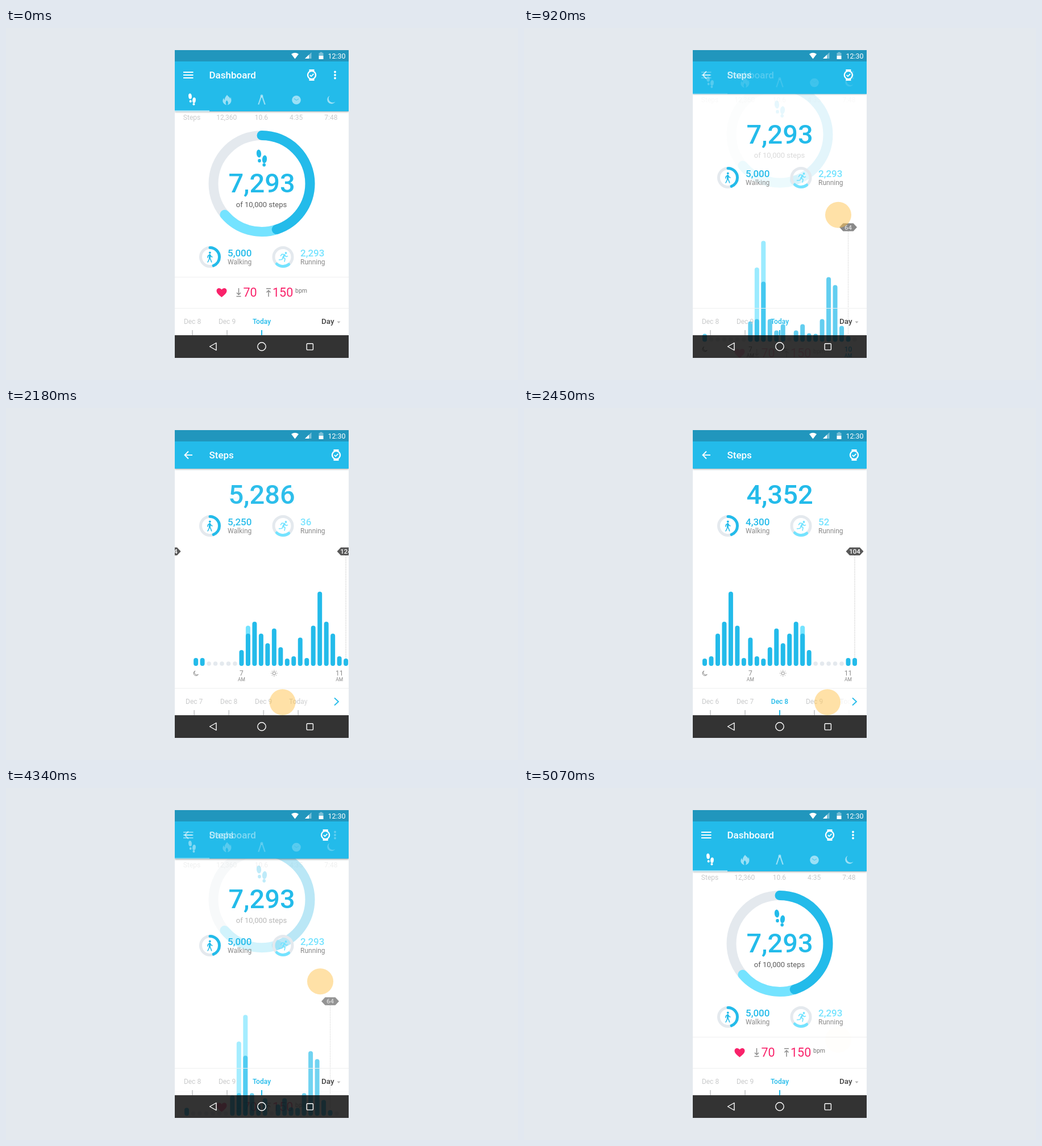
Recreate the animation shown at these times as an HTML page with a canvas. Size 901 by 621 pixels, loop 5.6 s.

```html
<!DOCTYPE html>
<html lang="en">
<head>
<meta charset="utf-8">
<title>Step tracker</title>
<style>
html, body { margin: 0; width: 100%; height: 100%; overflow: hidden; background: #e4e9ee; }
canvas { display: block; }
</style>
</head>
<body>
<canvas id="stage" width="901" height="621"></canvas>
<script>
const ctx = document.getElementById('stage').getContext('2d');
const LOOP = 5600, TICK = 30, PAGE = 306, DATE_GAP = 61, BASE = 455;
const BLUE = '#23bbea', SKY = '#74e3ff', PALE = '#e4e9ee', GREY = '#8a8a8a', FAINT = '#c9cacb', PINK = '#f9226a';

const clamp = v => Math.max(0, Math.min(1, v));
const ramp = (v, a, b) => clamp((v - a) / (b - a));
const smooth = v => v * v * (3 - 2 * v);
const rad = deg => (deg - 90) * Math.PI / 180;

// Bar tops: [top] or [runningTop, walkingTop]; 0 is an empty hour.
const dec8 = [442, 438, 398, 377, 324, 384, 441, 405, 438, 442, 422, 389, 415, 398, 377, [384, 398], 427,
  0, 0, 0, 0, 0, 441, 441];
const today = [441, 0, 0, 0, 0, 0, 0, 419, [324, 415], [277, 349], 415, 435, 424, 0, 435, 424, 440, 441,
  415, 341, 355, 427, 445, 0];
const days = [
  { total: '7,293', walk: '5,000', run: '2,293', bars: today, tip: '64', last: 22, hour: '10', color: BLUE },
  { total: '5,286', walk: '5,250', run: '36', bars: [...dec8].reverse(), tip: '124', last: 23, hour: '11', color: GREY },
  { total: '4,352', walk: '4,300', run: '52', bars: dec8, tip: '104', last: 23, hour: '11', color: GREY }
];

function layer(alpha, dx, dy, draw) {
  if (alpha <= 0) return;
  ctx.save();
  ctx.globalAlpha *= alpha;
  ctx.translate(dx, dy);
  draw();
  ctx.restore();
}
function rect(x, y, w, h, color) {
  ctx.fillStyle = color;
  ctx.fillRect(x, y, w, h);
}
function text(str, x, y, size, color, align = 'left', weight = 400) {
  ctx.font = `${weight} ${size}px Roboto, sans-serif`;
  ctx.textAlign = align;
  ctx.fillStyle = color;
  ctx.fillText(str, x, y);
}
function trace(points, close) {
  ctx.beginPath();
  for (let i = 0; i < points.length; i += 2) ctx.lineTo(points[i], points[i + 1]);
  if (close) ctx.closePath();
}
function line(points, color, width, close, cap = 'butt') {
  trace(points, close);
  ctx.lineCap = cap;
  ctx.lineJoin = cap === 'round' ? 'round' : 'miter';
  ctx.strokeStyle = color;
  ctx.lineWidth = width;
  ctx.stroke();
}
function poly(points, color) {
  trace(points, true);
  ctx.fillStyle = color;
  ctx.fill();
}
function dot(x, y, r, color, ry = r, turn = 0) {
  ctx.beginPath();
  ctx.ellipse(x, y, r, ry, turn, 0, 7);
  ctx.fillStyle = color;
  ctx.fill();
}
function arc(x, y, r, from, to, color, width) {
  ctx.beginPath();
  ctx.arc(x, y, r, rad(from), rad(to));
  ctx.lineCap = 'round';
  ctx.strokeStyle = color;
  ctx.lineWidth = width;
  ctx.stroke();
}
function shape(path, color, stroke) {
  const p = new Path2D(path);
  if (stroke) {
    ctx.strokeStyle = color;
    ctx.lineWidth = stroke;
    ctx.stroke(p);
  } else {
    ctx.fillStyle = color;
    ctx.fill(p);
  }
}

function feet(x, y, scale, color) {
  layer(1, x, y, () => {
    ctx.scale(scale, scale);
    dot(-5, -8, 4.1, color, 7, -0.1);
    dot(-4, 4.6, 2.8, color, 3.2);
    dot(5, 2, 4.1, color, 7, 0.1);
    dot(4.2, 12, 2.8, color, 3);
  });
}
function moon(x, y, r, color, stroke) {
  layer(1, x, y, () => {
    ctx.scale(r, r);
    shape('M-.3 -.95A1 1 0 1 0 .98 .45A.95 .95 0 0 1 -.3 -.95Z', color, stroke && stroke / r);
  });
}
function sun(x, y) {
  arc(x, y, 2.6, 0, 360, GREY, 1);
  for (let i = 0; i < 8; i++) {
    const c = Math.cos(i * Math.PI / 4), s = Math.sin(i * Math.PI / 4);
    line([x + c * 4.2, y + s * 4.2, x + c * 5.7, y + s * 5.7], GREY, 1);
  }
}
function limbs(list, color) {
  list.forEach(points => line(points, color, 1.6, false, 'round'));
}
function walker() {
  dot(.3, -7.6, 1.9, BLUE);
  line([0, -3.7, 0, 1.5], BLUE, 3, false, 'round');
  limbs([[0, 2, 1.8, 5, 3.2, 9], [-.5, 2, -1.4, 5, -3.4, 9], [0, -4, -3, -2, -3.6, 1], [1, -3.6, 2.4, -1, 4.4, 0]], BLUE);
}
function runner() {
  dot(5, -7, 1.9, SKY);
  line([2.6, -3.5, .2, .8], SKY, 3, false, 'round');
  limbs([[3, -3.5, 5, -.6, 8, -1.5], [2, -4.4, -2, -5, -4, -2], [0, 1, 3.6, 3, 2.6, 8], [0, 1, -2, 4.5, -7, 5]], SKY);
}
function watch(x, y) {
  layer(1, x, y, () => {
    rect(-4.5, -10, 9, 4, '#fff');
    rect(-4.5, 6, 9, 4, '#fff');
    dot(0, 0, 8.2, '#fff');
    dot(0, 0, 5.9, BLUE);
    line([-3.2, 0, -.9, 2.3, 3.4, -2.2], '#fff', 1.8);
  });
}

function ring() {
  arc(450, 274.5, 85, 0, 360, PALE, 17);
  arc(450, 274.5, 85, 161, 230, SKY, 17);
  arc(450, 274.5, 85, 0, 162, BLUE, 17);
  feet(450, 229.5, 1, BLUE);
}
function heartRow() {
  rect(297, 439, 306, 1, '#eeeff0');
  shape('M379.5 475C375 471 370.5 468 370.5 463.5C370.5 458 377 457.500 379.5 461.500C382 457.500 388.500 458 388.500 463.500C388.500 468 384 471 379.500 475Z', PINK);
  line([409.5, 459, 409.5, 470], GREY, 1.5);
  line([406, 467, 409.5, 470.5, 413, 467], GREY, 1.5);
  line([405.5, 473.5, 413.5, 473.5], GREY, 1.5);
  line([462, 463, 462, 474], GREY, 1.5);
  line([458.5, 466.500, 462, 463, 465.5, 466.5], GREY, 1.5);
  line([458, 459.7, 466, 459.7], GREY, 1.5);
  text('70', 417.5, 474, 21.5, PINK);
  text('150', 469, 474, 21.5, PINK);
  text('bpm', 509, 467, 10.5, '#777');
}
function bar(x, top, color) {
  ctx.beginPath();
  ctx.roundRect(x - 4, top, 8, BASE - top, 4);
  ctx.fillStyle = color;
  ctx.fill();
}
function axisHour(x, hour, color, weight) {
  text(hour, x, 472, 12, color, 'center', weight);
  text('AM', x, 482, 8.5, color, 'center', weight);
}
function chart(day) {
  const at = i => 318 + i * 264 / 23;
  const tipX = at(day.last);
  ctx.setLineDash([1.5, 1.5]);
  line([tipX, 260, tipX, 442], '#bbb', 1);
  ctx.setLineDash([]);
  day.bars.forEach((tops, i) => {
    if (!tops) return dot(at(i), 451, 3.8, PALE);
    const [high, low] = [].concat(tops);
    if (low) bar(at(i), high, SKY);
    bar(at(i), low || high, BLUE);
  });
  poly([tipX - 15.5, 253, tipX - 9, 246, tipX + 9, 246, tipX + 15.5, 253, tipX + 9, 260, tipX - 9, 260], '#595959');
  text(day.tip, tipX, 257, 11.5, '#fff', 'center', 500);
  moon(at(0), 468, 4.4, GREY, 1);
  axisHour(at(7), '7', GREY, 400);
  sun(at(12), 468);
  axisHour(at(22), day.hour, day.color, day.color === BLUE ? 500 : 400);
}
function stats(d) {
  arc(359, 404, 16.5, 0, 360, PALE, 5);
  arc(359, 404, 16.5, 0, 158, BLUE, 5);
  layer(1, 358.500, 404, walker);
  arc(487.5, 404, 16.5, 0, 360, PALE, 5);
  arc(487.5, 404, 16.5, 142, 222, SKY, 5);
  layer(1, 487.5, 404, runner);
  days.forEach((day, k) => layer(1 - Math.abs(d - k), 0, 0, () => {
    text(day.walk, 390, 402.5, 17, BLUE, 'left', 500);
    text(day.run, 518, 402.5, 17, SKY, 'left', 500);
  }));
  text('Walking', 390, 417, 12, GREY);
  text('Running', 518, 417, 12, GREY);
}
function dateStrip(d, t) {
  rect(297, 494, 306, 1, '#eeeff0');
  const shift = d * DATE_GAP;
  ['Today', 'Dec 9', 'Dec 8', 'Dec 7', 'Dec 6'].forEach((name, i) => {
    const x = 450 + shift - i * DATE_GAP, active = i === d;
    text(name, x, 522, 12, active ? BLUE : FAINT, 'center', active ? 500 : 400);
    rect(x - 1, 533, 2, 9, active ? BLUE : '#d0d1d2');
  });
  text('Day', 555 + shift, 522, 13.5, '#444', 'left', 500);
  poly([582.500 + shift, 517.5, 588.5 + shift, 517.5, 585.5 + shift, 521], '#b5b5b5');

  const arrow = clamp((d - .3) * 1.5);
  layer(arrow, 0, 0, () => {
    const fade = ctx.createLinearGradient(515, 0, 578, 0);
    fade.addColorStop(0, 'rgba(255,255,255,0)');
    fade.addColorStop(1, '#fff');
    rect(515, 496, 88, 46, fade);
    const press = ramp(t, 3020, 3450) * (t < 3650);
    if (press) dot(581, 519, 15.3 * Math.sqrt(press), '#ccd3d6');
    line([578, 511.5, 585, 518, 578, 524.5], BLUE, 1.8);
  });
}
function header(q) {
  const bottom = 147 - 40 * q, soft = (1 - q) ** 1.5;
  ctx.save();
  ctx.shadowColor = 'rgba(0,0,0,.35)';
  ctx.shadowBlur = 3;
  ctx.shadowOffsetY = 1;
  rect(297, 59, 306, bottom - 59, BLUE);
  ctx.restore();
  layer(1 - q, 0, -40 * q, () => {
    rect(297, 145.5, 61, 2, '#c8eefa');
    feet(327.5, 126, .7, '#fff');
    layer(.55, 0, 0, () => {
      shape('M389 118C391 121 394 122 394.500 125C395 123.500 395 122.500 394.800 121.500C398 127 397 134 389.500 136C392 133 391 130 388.500 127.500C386 130 386 133 388 136C381 134 380 128 383 123.500C383.500 125.500 384 126.500 385 127C384.500 123 387 121 389 118Z', '#fff');
      line([449, 121, 444.3, 135], '#fff', 2.2);
      line([451, 121, 455.7, 135], '#fff', 2.2);
      dot(450, 120, 2.4, '#fff');
      dot(511, 127, 7.8, '#fff');
      line([507, 124.5, 511, 127.5, 515, 125], BLUE, 1.4);
      moon(572, 126.500, 7.5, '#fff');
    });
  });
  layer(1 - q, 0, 0, () => {
    [78, 83, 88].forEach(y => rect(312, y - 1, 17.5, 2, '#fff'));
    text('Dashboard', 357.5, 89, 17, '#fff', 'left', 500);
  });
  layer(soft, 0, 0, () => [77.5, 83, 88.5].forEach(y => dot(579, y, 1.9, '#fff')));
  layer(q, 0, 0, () => {
    line([328, 83, 315, 83], '#fff', 1.8);
    line([321, 76.5, 314.5, 83, 321, 89.5], '#fff', 1.8);
    text('Steps', 357.5, 89, 17, '#fff', 'left', 500);
  });
  watch(538 + 43 * q, 83);
}
function statusBar() {
  rect(297, 39, 306, 20, '#2196bd');
  shape('M502 46Q508.500 41.500 515 46L508.500 54.500Z', '#fff');
  poly([526, 54, 537.5, 54, 537.5, 43], 'rgba(255,255,255,.4)');
  poly([526, 54, 533, 54, 533, 47.3], '#fff');
  rect(550.5, 44, 8, 5, 'rgba(255,255,255,.4)');
  rect(552.5, 42.5, 4, 1.5, 'rgba(255,255,255,.4)');
  rect(550.5, 49, 8, 6, '#fff');
  text('12:30', 566.5, 53.500, 12.5, '#fff');
}
function navBar() {
  rect(297, 542, 306, 40, 'rgba(0,0,0,.8)');
  line([358.5, 562, 370, 555.5, 370, 568.5], '#fff', 1.4, true, 'round');
  arc(450, 562, 7.2, 0, 360, '#fff', 1.4);
  ctx.beginPath();
  ctx.roundRect(529.2, 556.7, 11.2, 11.2, 1.5);
  ctx.stroke();
}
function touch(t, p, d) {
  let x = 553 - 7 * ramp(p, .75, 1), y = 284 + 160 * (1 - p), alpha;
  if (t < 3500) {
    const move = smooth(ramp(t, 1400, 1740));
    x += (434 - x) * move + 50 * d * (t > 1740);
    y += (519 - y) * move;
    alpha = ramp(t, 140, 370) * (1 - ramp(t, 2450, 3020));
  } else {
    alpha = ramp(t, 3920, 4100) * (1 - ramp(t, 4780, 5070));
  }
  layer(alpha, 0, 0, () => dot(x, y, 23, 'rgba(255,196,80,.5)'));
}

function render(t) {
  const back = ramp(t, 4115, 4745), there = ramp(t, 470, 1100);
  const p = there - back;
  const q = there ** .8 - back ** .8;
  const d = 2 * (ramp(t, 1880, 2450) - ramp(t, 3530, 3650));
  const soft = (1 - q) ** 1.5;

  rect(0, 0, 901, 621, PALE);
  ctx.save();
  ctx.beginPath();
  ctx.rect(297, 39, 306, 543);
  ctx.clip();
  rect(297, 39, 306, 543, '#fff');

  layer(soft, 0, -40 * q, () => ['Steps', '12,360', '10.6', '4:35', '7:48']
    .forEach((label, i) => text(label, 327 + i * 61.2, 162, 12, FAINT, 'center')));
  layer(soft, 0, -121 * p, ring);
  layer(1 - q, 0, -121 * p, () => text('of 10,000 steps', 449.5, 315.5, 13, '#5c5c5c', 'center'));
  layer(1 - q, 0, 150 * p, heartRow);
  layer(p, 0, 345 * (1 - p), () =>
    days.forEach((day, k) => layer(Math.abs(d - k) < 1 ? 1 : 0, (d - k) * PAGE, 0, () => chart(day))));
  days.forEach((day, k) => layer(1 - Math.abs(d - k), 0, -121 * p,
    () => text(day.total, 450, 290, 47, BLUE, 'center', 500)));
  layer(1, 0, -196 * p, () => stats(d));
  dateStrip(d, t);
  header(q);
  statusBar();
  touch(t, p, d);
  navBar();
  ctx.restore();
}

function frame() {
  const t = performance.now() % LOOP;
  render(Math.max(0, Math.floor((t - 20) / TICK) * TICK + 20));
  requestAnimationFrame(frame);
}
frame();
</script>
</body>
</html>
```
